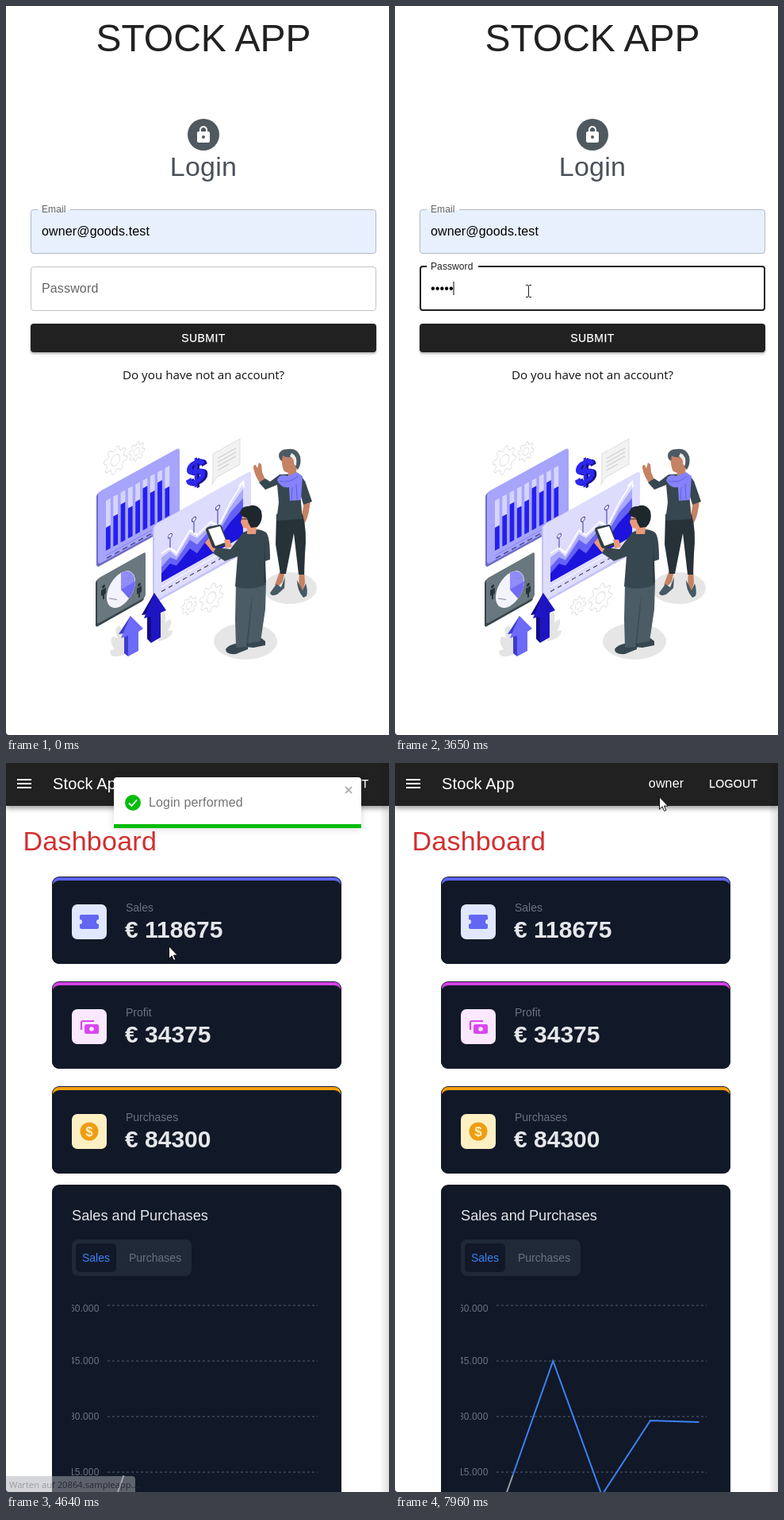
Write an HTML page that moves like this. It is 483 px wide and 918 px high and loops after 8 s.

```html
<!DOCTYPE html>
<html lang="en">
<head>
<meta charset="utf-8">
<title>Stock App</title>
<style>
html, body { margin: 0; height: 100%; overflow: hidden; background: #fff; }
svg { display: block; width: 483px; height: 918px; }
text { font-family: "Liberation Sans", Arial, sans-serif; font-size: 16px; white-space: pre; }
.mid { text-anchor: middle; }
.segoe { font-family: "Open Sans", sans-serif; }
.body { letter-spacing: .15px; }
.btn { font-size: 14px; letter-spacing: .4px; fill: #fff; stroke: #fff; stroke-width: .25px; }
.h4 { font-size: 34px; letter-spacing: .25px; }
.small { font-size: 12px; letter-spacing: .1px; }
.label { fill: #666; }
.cap { font-size: 14px; fill: #6b7280; }
.sum { font-size: 30px; font-weight: 700; fill: #e5e7eb; }
.tick { font-size: 12px; letter-spacing: .15px; fill: #6b7280; text-anchor: end; }
.field { fill: none; stroke: #c4c4c4; }
.submit { fill: #212121; filter: drop-shadow(0 2px 1.5px rgba(0,0,0,.3)); }

/* Everything changes in hard steps on one 8 s clock. */
.t { animation: 8s step-end infinite; }
.login { animation-name: login; }
.dash { animation-name: dash; }
.filled { animation-name: filled; }
.empty { animation-name: empty; }
.idle { animation-name: idle; }
.over { animation-name: over; }
.focus { animation-name: focus; }
.type { animation-name: type; }
.caret { animation-name: caret; }
.press { animation-name: press; }
.glow { animation-name: glow; }
.beam { animation-name: beam; }
.arrow { animation-name: arrow; }
.status { animation-name: status; }
.tip { animation-name: tip; }
.line { animation-name: line; }
.toast { animation-name: toast; }
.bar { animation-name: bar; }
@keyframes login { 0% { opacity: 1 } 53.875% { opacity: 0 } }
@keyframes dash { 0% { opacity: 0 } 53.875% { opacity: 1 } }
@keyframes filled { 0% { opacity: 1 } 49.75% { opacity: 0 } }
@keyframes empty { 0% { opacity: 0 } 49.75% { opacity: 1 } }
@keyframes idle { 0% { opacity: 1 } 16.5% { opacity: 0 } }
@keyframes over { 0% { opacity: 0 } 16.5% { opacity: 1 } 20.75% { opacity: 0 } 49.75% { opacity: 1 } }
@keyframes focus { 0% { opacity: 0 } 20.75% { opacity: 1 } 49.75% { opacity: 0 } }
@keyframes type {
  0% { transform: none }
  33.25% { transform: translateX(5.75px) }
  37.375% { transform: translateX(11.5px) }
  41.5% { transform: translateX(23px) }
  45.625% { transform: translateX(28.5px) }
}
@keyframes caret { 0% { opacity: 1 } 24.875% { opacity: 0 } 33.25% { opacity: 1 } }
@keyframes press { 0% { opacity: 0 } 12.375% { opacity: 1 } 16.5% { opacity: 0 } }
@keyframes glow { 0% { opacity: 0 } 16.5% { opacity: 1 } 20.75% { opacity: 0 } }
@keyframes beam { 0% { opacity: 0 } 16.5% { opacity: 1 } 53.875% { opacity: 0 } }
@keyframes arrow {
  0% { opacity: 0; transform: translate(365px,224px) }
  4.125% { opacity: 1; transform: translate(365px,224px) }
  8.25% { opacity: 1; transform: translate(133px,95px) }
  12.375% { opacity: 0; transform: none }
  53.875% { opacity: 1; transform: translate(167px,360px) }
  58% { opacity: 1; transform: translate(205px,230px) }
  62.375% { opacity: 1; transform: translate(246px,83px) }
  66.5% { opacity: 1; transform: translate(240px,53px) }
  70.625% { opacity: 1; transform: translate(255px,136px) }
  74.75% { opacity: 1; transform: translate(256px,137px) }
  78.875% { opacity: 1; transform: translate(144px,365px) }
  83% { opacity: 1; transform: translate(164px,365px) }
  87.125% { opacity: 1; transform: translate(160px,394px) }
  91.25% { opacity: 1; transform: translate(132px,140px) }
  95.375% { opacity: 1; transform: translate(26px,25px) }
  99.5% { opacity: 1; transform: translate(333px,42px) }
}
@keyframes status { 0% { opacity: 1 } 58% { opacity: .5 } 62.375% { opacity: 0 } }
@keyframes tip { 0% { opacity: 0 } 58% { opacity: 1 } }
@keyframes line { 0% { opacity: 0 } 62.375% { opacity: 1 } }
@keyframes toast {
  0% { opacity: 0; transform: none }
  58% { opacity: 1; transform: translateX(-14px) }
  62.375% { opacity: 1; transform: none }
  91.25% { opacity: 0; transform: none }
}
@keyframes bar {
  0% { width: 312px }
  62.375% { width: 306px }
  66.5% { width: 302px }
  70.625% { width: 288px }
  74.75% { width: 219px }
  78.875% { width: 150px }
  83% { width: 84px }
  87.125% { width: 15px }
}
</style>
</head>
<body>
<svg viewBox="0 0 483 918" xmlns="http://www.w3.org/2000/svg">
<defs>
  <linearGradient id="edge"><stop stop-opacity="0"/><stop offset="1" stop-opacity=".13"/></linearGradient>
  <clipPath id="axis"><rect x="83" y="660" width="310" height="258"/></clipPath>
  <g id="card">
    <rect width="365" height="110" rx="9" fill="#111827"/>
    <rect x="1" y="1" width="363" height="60" rx="8" fill="currentColor"/>
    <rect y="5" width="365" height="105" rx="9" fill="#111827"/>
  </g>
</defs>

<g class="t login">
  <text class="mid" x="249" y="57" style="font-size:48px" fill="#212121">STOCK APP</text>
  <circle cx="249" cy="162" r="20" fill="#4f595f"/>
  <path transform="translate(237 150)" fill="#fff" d="M18 8h-1V6c0-2.76-2.24-5-5-5S7 3.24 7 6v2H6c-1.1 0-2 .9-2 2v10c0 1.1.9 2 2 2h12c1.1 0 2-.9 2-2V10c0-1.1-.9-2-2-2zm-6 9c-1.1 0-2-.9-2-2s.9-2 2-2 2 .9 2 2-.9 2-2 2zm3.1-9H8.9V6c0-1.71 1.39-3.1 3.1-3.1s3.1 1.39 3.1 3.1v2z"/>
  <text class="mid h4" x="249" y="214" fill="#4b5158">Login</text>

  <g class="t filled">
    <rect x="31" y="256" width="436" height="56" rx="4" fill="#e8f0fe"/>
    <path class="field" style="stroke:#b2b9c6" d="M81 256.5H463a3.5 3.5 0 0 1 3.5 3.5V308a3.5 3.5 0 0 1-3.5 3.5H35a3.5 3.5 0 0 1-3.5-3.5V260a3.5 3.5 0 0 1 3.5-3.5H40"/>
    <path d="M40 256.5H81" stroke="#fff"/>
    <text class="small label" x="45" y="260">Email</text>
    <text class="body" x="45" y="289">owner@goods.test</text>
  </g>
  <g class="t empty">
    <rect class="field" x="31.5" y="256.5" width="435" height="55" rx="3.5"/>
    <text class="body label" x="45" y="289">Email</text>
  </g>

  <g class="t idle">
    <rect class="field" x="31.5" y="328.5" width="435" height="55" rx="3.5"/>
    <text class="body label" x="45" y="361">Password</text>
  </g>
  <g class="t over">
    <rect class="field" style="stroke:#212121" x="31.5" y="328.5" width="435" height="55" rx="3.5"/>
    <text class="body label" x="45" y="361">Password</text>
  </g>
  <g class="t focus">
    <path class="field" style="stroke:#212121;stroke-width:2" d="M105 328H463a3 3 0 0 1 3 3V380a3 3 0 0 1-3 3H35a3 3 0 0 1-3-3V331a3 3 0 0 1 3-3H40"/>
    <text class="small" x="45" y="332" fill="#212121">Password</text>
    <text class="body" x="45" y="361">•••••</text>
    <g class="t type">
      <rect x="45" y="346" width="40" height="20" fill="#fff"/>
      <rect class="t caret" x="45" y="347" width="1" height="17"/>
    </g>
  </g>

  <rect class="submit" x="31" y="400" width="436" height="36" rx="4"/>
  <rect class="t press submit" style="fill:#171717" x="31" y="400" width="436" height="36" rx="4"/>
  <text class="mid btn" x="249" y="423">SUBMIT</text>
  <text class="mid segoe" style="font-size:15.2px" x="249" y="470" fill="#111">Do you have not an account?</text>

  <!-- illustration -->
  <g id="gears" fill="#fff" stroke="#dedede"></g>
  <g transform="matrix(1 -.55 0 1 115 613)">
    <rect x="-1" y="1" width="104" height="93" rx="4" fill="#6f6cc4"/>
    <rect x="1" width="103" height="91" rx="4" fill="#a6a4fb"/>
    <g id="bars"></g>
    <path d="M11 85H98" stroke="#8583ee"/>
    <path d="M12 89H98" stroke="#303070" stroke-width="1.2" stroke-dasharray="6 4"/>
  </g>
  <g transform="matrix(1 -.56 0 1 261 564)">
    <path d="M0 0H34V32H5L-1 38 0 26z" fill="#f2f2f2" stroke="#dcdcdc"/>
    <path d="M6 9H29M6 14H29M6 19H29M6 24H20" stroke="#d0d0d0" stroke-width="1.4"/>
  </g>
  <g font-weight="700" transform="translate(227 607) skewY(-22)">
    <text x="3" y="2" style="font-size:44px" fill="#15108c" stroke="#15108c">$</text>
    <text x="0" y="0" style="font-size:44px" fill="#2d26ec" stroke="#2d26ec">$</text>
  </g>
  <g transform="matrix(1 -.56 0 1 186 654)">
    <rect x="-1" y="1" width="122" height="98" rx="4" fill="#c4c2f6"/>
    <rect x="1" width="122" height="96" rx="4" fill="#dddcfd"/>
    <path fill="#aaa8fb" d="M10 46L21 44 29 56 46 37 55 47 72 40 82 51 97 31 113 17V77H10z"/>
    <path fill="#6561f4" d="M10 58L21 52 29 60 46 44 55 55 72 45 82 55 97 38 113 29V77H10z"/>
    <path fill="#1c13dd" d="M10 66L21 60 29 67 46 55 55 66 72 52 82 63 97 50 113 42V77H10z"/>
    <path fill="none" stroke="#fff" stroke-width="2" d="M10 41L21 40 29 51 46 32 55 43 72 36 82 47 97 25 113 9M107 11L113 8 114 16"/>
    <path d="M10 83H116" stroke="#fff"/>
    <path d="M10 89H116" stroke="#34344f" stroke-width="1.2" stroke-dasharray="5 4"/>
    <g fill="#fff" stroke="#3b36a8"><path d="M21 28V40M51 24V38M81 26V44"/><circle cx="21" cy="25" r="2.5"/><circle cx="51" cy="21" r="2.5"/><circle cx="81" cy="23" r="2.5"/></g>
  </g>
  <g transform="matrix(1 -.56 0 1 114 722)">
    <rect x="-1" y="1" width="61" height="59" rx="3" fill="#37444b"/>
    <rect x="1" width="61" height="57" rx="3" fill="#69777e"/>
    <ellipse cx="31" cy="30" rx="18" ry="21" fill="#f3f3fb"/>
    <path d="M31 30V9A18 21 0 0 1 41 47z" fill="#8f8cfb"/>
    <path d="M31 30L41 47A18 21 0 0 0 49 30z" fill="#6f6bf5"/>
    <path d="M16 33l10 7M37 20l9 4" stroke="#8d8da8" stroke-width=".8"/>
    <g fill="#26323a"><circle cx="9" cy="14" r="2"/><path d="M6 17h6v7l-2 1v5H8v-5l-2-1z"/><circle cx="54" cy="37" r="2"/><path d="M51 40h6v7l-2 1v5h-2v-5l-2-1z"/></g>
  </g>
  <g fill="#e4e4e4"><path d="M151 816q-20 8-20-4l6-2q-8-12-2-16l6 2q-6-12 2-16 8 12 10 36z"/><path d="M192 800q18-4 18-14l-6 1q7-11 3-15l-6 4q1-12-2-14-8 12-7 38z"/></g>
  <path fill="#3f3bd0" d="M157 768L142 791 149 790V815L154 819 158 790z"/>
  <path fill="#6d6af8" d="M157 768L173 784 167 788V812L154 819V793L145 796z"/>
  <path fill="#120c88" d="M187 739L171 767 178 766V797L183 802 188 765z"/>
  <path fill="#1e15c2" d="M187 739L202 761 195 764V795L183 802V769L174 771z"/>

  <!-- standing woman -->
  <ellipse cx="358" cy="733" rx="34" ry="20" fill="#e6e6e6"/>
  <path fill="#c58264" d="M312 582q0-5 3-4l2 4 2-7 3 2 1 10 5 12-6 4q-8-10-10-21zM376 624l8-1q-2 18-6 26l-6 7-3-5 4-9z"/>
  <path fill="#c58264" d="M346 710l6 1-3 14-6 6-4-2zM370 710l6 0 1 16-3 12-5-6z"/>
  <path fill="#263238" d="M341 640L374 640Q380 660 377 690L376 716 369 716 363 664 353 715 346 715 340 678z"/>
  <path fill="#37474f" d="M342 603L327 609 319 600 327 595 333 599 345 590 366 589Q376 592 379 604L386 624 375 628 371 614 374 646 341 648 344 625z"/>
  <path fill="#c58264" d="M348 566Q347 580 351 586L356 588 355 595 365 595 367 580 368 566z"/>
  <path fill="#4d5a61" d="M344 566Q345 558 355 558 367 556 371 567 373 577 368 584L365 580Q366 572 361 568 352 569 349 566L348 573Q344 571 344 566z"/>
  <path fill="#ececec" d="M360 563Q368 566 366 579L363 577Q364 570 358 567z"/>
  <path fill="#8582fb" d="M342 597Q345 588 355 592L367 587 374 592 372 622 358 623 357 606Q347 608 342 597z"/>
  <path fill="none" stroke="#615de6" d="M345 598q12 4 23-6M361 606l-1 16M366 602l1 19"/>
  <path fill="#455a64" d="M333 739l8-11 6 4 5-13-1 14-9 8q-8 3-9-2zM367 723l7 13 4-9q3 10 1 16l-4 2q-8-9-8-22z"/>

  <!-- man with tablet -->
  <ellipse cx="302" cy="800" rx="40" ry="23" fill="#e6e6e6"/>
  <path fill="#37474f" d="M277 810q3-5 12-7l16-1v8l-15 6q-13 1-13-6zM302 800l20-4 5 4v5l-15 3-10-1z"/>
  <path fill="#4b5c65" d="M290 728L328 725 327 760 321 800 304 803 308 758 304 807 290 808 289 772z"/>
  <path fill="#263238" opacity=".35" d="M308 758l3-16-6 66-2-2z"/>
  <path fill="#e99a7a" d="M251 676l5-7 6 6 5 11-6 2z"/>
  <path fill="#37474f" d="M299 663Q316 655 328 663 333 668 333 697L327 699 327 729Q308 737 289 731L292 693 276 699 261 689 265 682 283 684z"/>
  <path fill="#2c3a41" d="M326 671l2 54-3 2z"/>
  <path fill="#2f3c43" d="M252 660q0-3 3-4l14-3q2 0 3 2l7 20q0 3-2 4l-13 4q-3 0-4-2z"/>
  <path fill="#fff" d="M255 659l15-4 8 20-14 5z"/>
  <path fill="#e99a7a" d="M275 672l7 0 3 9-8 2zM298 642L296 650 299 657 304 658 304 665 315 665 317 650z"/>
  <path fill="#1d272c" d="M295 640Q296 629 306 630 316 626 322 636 325 648 317 656L309 657Q305 651 304 645L299 643z"/>
  <path d="M297 646h9" stroke="#1d272c"/>
</g>

<g class="t dash">
  <rect width="483" height="918" fill="#fff"/>
  <rect width="483" height="54" fill="#212121" style="filter:drop-shadow(0 3px 3px rgba(0,0,0,.4))"/>
  <path fill="#fff" d="M14 20h18v2H14zM14 25h18v2H14zM14 30h18v2H14z"/>
  <text class="body" style="font-size:20px" x="59" y="33" fill="#fff">Stock App</text>
  <text class="body mid" x="342" y="31" fill="#fff">owner</text>
  <text class="btn" x="396" y="31">LOGOUT</text>
  <rect x="471" width="12" height="918" fill="url(#edge)"/>
  <text class="h4" x="21.5" y="110" fill="#d32f2f">Dashboard</text>

  <use href="#card" x="58" y="143" color="#5f64ef"/>
  <rect x="83" y="178" width="44" height="44" rx="7" fill="#e0e7ff"/>
  <path fill="#6366f1" d="M95 191h20a2 2 0 0 1 2 2v4a3 3 0 0 0 0 6v4a2 2 0 0 1-2 2H95a2 2 0 0 1-2-2v-4a3 3 0 0 0 0-6v-4a2 2 0 0 1 2-2z"/>
  <text class="cap" x="151" y="187">Sales</text>
  <text class="sum" x="150" y="220">€ 118675</text>

  <use href="#card" x="58" y="275" color="#d541e6"/>
  <rect x="83" y="310" width="44" height="44" rx="7" fill="#fae8ff"/>
  <path fill="none" stroke="#d946ef" stroke-width="2.2" d="M95 336V327a2 2 0 0 1 2-2H111"/>
  <rect x="99" y="329" width="18" height="12" rx="2.5" fill="#d946ef"/>
  <circle cx="108" cy="335" r="2.8" fill="#fae8ff"/>
  <text class="cap" x="151" y="319">Profit</text>
  <text class="sum" x="150" y="352">€ 34375</text>

  <use href="#card" x="58" y="407" color="#f59e0b"/>
  <rect x="83" y="442" width="44" height="44" rx="7" fill="#fef0c3"/>
  <circle cx="105" cy="464" r="11.5" fill="#ee9d12"/>
  <text class="mid" x="105" y="470" style="font-size:17px" font-weight="700" fill="#fef0c3">$</text>
  <text class="cap" x="151" y="451">Purchases</text>
  <text class="sum" x="150" y="484">€ 84300</text>

  <rect x="58" y="531" width="365" height="400" rx="9" fill="#111827"/>
  <text style="font-size:18.2px" x="83" y="576" fill="#e5e7eb">Sales and Purchases</text>
  <rect x="83" y="600" width="151" height="46" rx="8" fill="#1f2937"/>
  <rect x="88" y="605" width="51" height="36" rx="5" fill="#111827"/>
  <text class="cap" style="fill:#3b82f6" x="96" y="628">Sales</text>
  <text class="cap" x="155" y="628">Purchases</text>

  <g clip-path="url(#axis)">
    <path d="M128 683H393M128 753H393M128 823H393M128 893H393" stroke="#3f4856" stroke-width="1.3" stroke-dasharray="3 3"/>
    <text class="tick" x="117.500" y="691">60.000</text>
    <text class="tick" x="117.500" y="757">45.000</text>
    <text class="tick" x="117.500" y="827">30.000</text>
    <text class="tick" x="117.500" y="897">15.000</text>
    <path class="t tip" d="M138.6 925L148.5 897" stroke="#9a9fa8" stroke-width="2"/>
    <path class="t line" d="M148.5 897L199.3 753 260.8 922 322 828 383.4 830" fill="none" stroke="#3b82f6" stroke-width="2"/>
  </g>

  <g class="t status">
    <path d="M0 898H159a4 4 0 0 1 4 4V918H0z" fill="#aaaeb3"/>
    <text class="segoe" style="font-size:11.2px" x="4" y="913" fill="#33373b">Warten auf 20864.sampleapp....</text>
  </g>

  <g class="t toast">
    <rect x="150" y="18" width="312" height="64" rx="4" fill="#fff" style="filter:drop-shadow(0 1px 5px rgba(0,0,0,.15))"/>
    <circle cx="174" cy="50" r="10" fill="#07bc0c"/>
    <path d="M169 50.5l3.5 3.5 6.5-7.5" fill="none" stroke="#fff" stroke-width="1.8"/>
    <text class="body" x="194" y="55" fill="#757575">Login performed</text>
    <path d="M442 30l8 8m0-8l-8 8" stroke="#b3b3b3" stroke-width="2"/>
    <rect class="t bar" x="150" y="77" width="312" height="5" fill="#07bc0c"/>
  </g>
</g>

<path d="M0 914Q0 918 4 918H0z" fill="#333"/>

<!-- pointers -->
<path class="t press" transform="translate(180 405)" fill="#fff" stroke="#000" d="M4.500 10V2q0-1.500 1.500-1.500T7.500 2v5l7 1.500q1.500.5 1.500 2V15l-2 5H7l-6-8q0-2 2-1.500z"/>
<circle class="t glow" cx="166" cy="358" r="12" fill="#ffff7f"/>
<path class="t beam" d="M165 351.500h3m1 0h3M168.500 352V366M165 366.500h3m1 0h3" fill="none" stroke="#222"/>
<path class="t arrow" fill="#fff" stroke="#000" stroke-width=".9" d="M.5 .8V16.300l3.600-3.400 2.500 5.600 2.300-1-2.500-5.400h4.900z"/>
</svg>
<script>
const put = (id, html) => { document.getElementById(id).innerHTML = html; };

const heights = [29, 38, 48, 38, 41, 53, 42, 50, 37];
put('bars', heights.map((h, i) => {
  const bar = (y, fill) => `<rect x="${11 + 9.3 * i}" y="${y}" width="5.8" height="${79 - y}" fill="${fill}"/>`;
  return bar(16, '#d5d4fe') + bar(79 - h, '#241fee');
}).join(''));

const gear = (x, y, r) => {
  const pts = Array.from({ length: 32 }, (_, k) => {
    const a = (k + .5) * Math.PI / 16;
    const d = k % 4 < 2 ? r : r * .74;
    return (d * Math.cos(a)).toFixed(1) + ',' + (d * Math.sin(a)).toFixed(1);
  });
  return `<g transform="matrix(.87 -.4 0 1 ${x} ${y})"><polygon points="${pts.join(' ')}"/><circle r="${r * .4}"/></g>`;
};
put('gears', gear(138, 572, 17) + gear(165, 561, 11.5) + gear(231, 755, 11) + gear(259, 745, 17));
</script>
</body>
</html>
```
